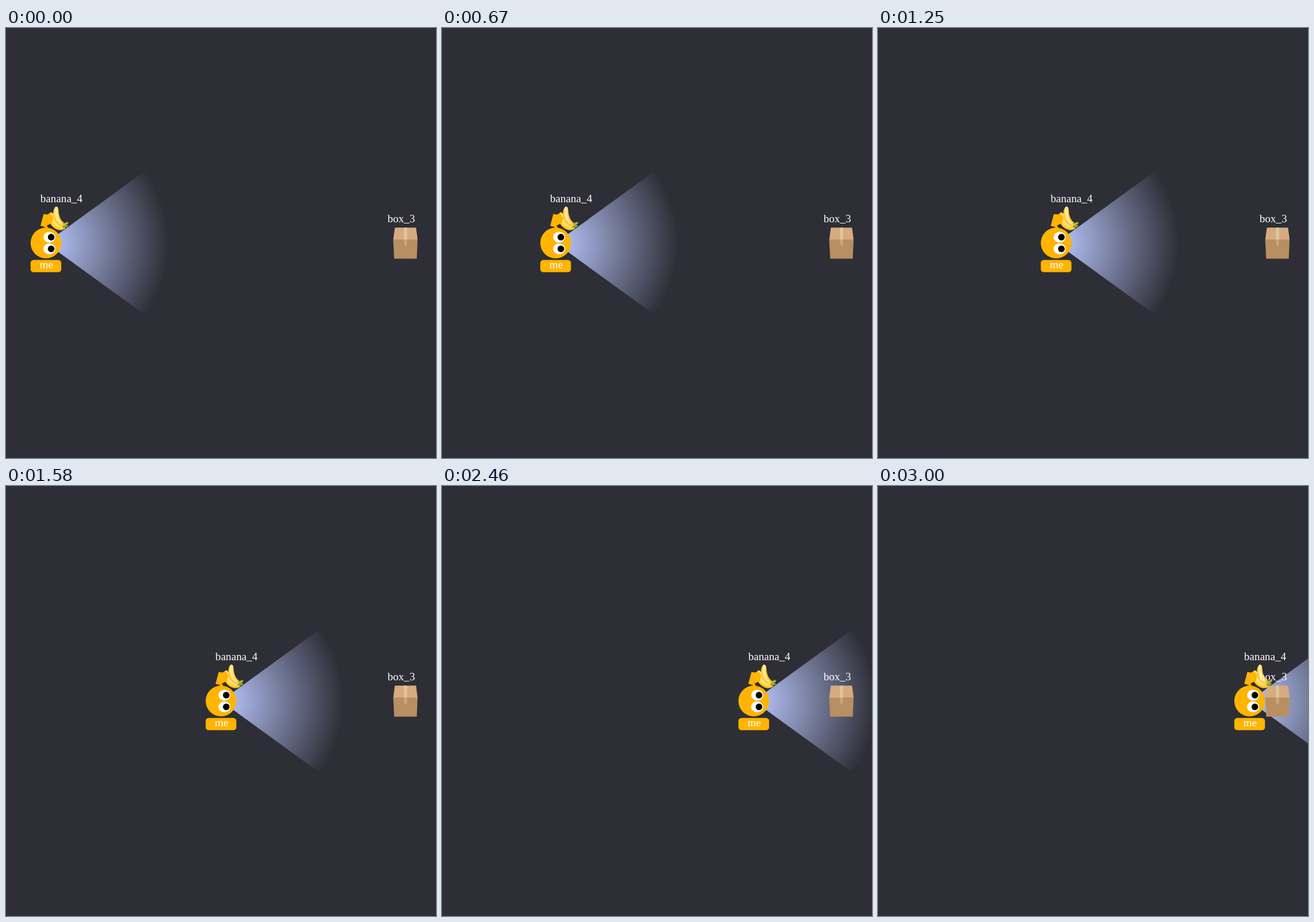
Animation, 748 px wide and 748 px high, one loop 3290 ms. Source, as an HTML page:

```html
<!DOCTYPE html>
<html lang="en">
<head>
<meta charset="utf-8">
<title>Carrying a banana to a box</title>
<style>
  html, body { margin: 0; width: 100%; height: 100%; overflow: hidden; background: #2e2e36; }
  svg { display: block; width: 100vw; height: 100vh; }
  text { font: 19.1px "Liberation Serif", "Times New Roman", Times, serif; fill: #fff; }
</style>
</head>
<body>
<svg viewBox="0 0 748 748">
  <defs>
    <radialGradient id="light" gradientUnits="userSpaceOnUse" cx="69.46" cy="374" r="213.7">
      <stop offset="0" stop-color="#bac8ff"/>
      <stop offset="1" stop-color="#bac8ff" stop-opacity="0"/>
    </radialGradient>
  </defs>

  <g class="mover">
    <path fill="url(#light)" d="M69.46 374L242.35 248.39A213.7 213.7 0 0 1 242.35 499.61Z"/>

    <!-- banana -->
    <path fill="#fdd835" d="M77 321C80 320 82 323 84 328C87 337 94 343 103 345L103 349C97 353 89 352 83 347C76 342 74 332 77 321Z"/>
    <path fill="#ffe082" d="M77 321C80 320 82 323 84 328C87 337 94 343 102 346C92 348 85 344 81 338C78 333 76 327 77 321Z"/>
    <path fill="#fbc02d" d="M77 339C83 346 92 350 102 349C97 353 89 352 83 347C80 345 78 342 77 339Z"/>
    <path fill="#ffca28" d="M86 311Q88 310 90 312C92 315 91 321 93 327C95 334 99 338 104 341L101 346C93 346 86 340 83 332C81 324 82 315 86 311Z"/>
    <path fill="#ffe59a" d="M86 311Q88 310 90 312C91 315 89 321 91 328C92 335 97 341 102 343C95 343 88 337 86 330C84 323 84 316 86 311Z"/>
    <path fill="#9aa32c" d="M98 340Q102 340 106 337L109 339Q107 342 104 343L108 343L107 346Q103 346 101 349L98 346L100 343Z"/>
    <path fill="#c0ca33" d="M99 341Q103 341 106 339L107 340Q104 342 100 344Z"/>

    <g fill="#ffb400">
      <path d="M60 344L65.5 323.5L72 324.5L77 321.5L82.5 330L80 339.5L71 343.5L74 349H65L68.5 346.5Z"/>
      <circle cx="69.46" cy="374" r="26.7"/>
      <rect x="42.75" y="403.4" width="53.4" height="21.4" rx="5.3"/>
    </g>
    <g fill="#fff">
      <ellipse cx="75.5" cy="363.8" rx="10.5" ry="9.4"/>
      <ellipse cx="75.5" cy="384.2" rx="10.5" ry="9.4"/>
    </g>
    <circle cx="78.6" cy="363.8" r="5.8"/>
    <circle cx="78.6" cy="384.2" r="5.8"/>
  </g>

  <path fill="#d6ab80" d="M676.5 347.3H713.3L716 368.5H673.6Z"/>
  <path fill="#b78f61" d="M673.6 368H716L714.5 401.2H675.3Z"/>
  <path fill="#e0c59e" d="M692.3 347.3H697.7V368H692.3Z"/>
  <path fill="#c7a678" d="M692.3 368H697.7V378.5H692.3Z"/>

  <g class="mover">
    <text x="59.8" y="302.8">banana_4</text>
    <text x="58.6" y="417.8">me</text>
  </g>
  <text x="663.7" y="337.8">box_3</text>
</svg>
<script>
  const LOOP = 3290, STEPS = 72, DISTANCE = 577.03;
  const movers = document.querySelectorAll(".mover");

  // Steps run at 24 per second, with their start times rounded to 10 ms.
  const startOf = n => Math.round(n * 100 / 24) * 10;

  function draw(now) {
    const t = now % LOOP;
    let n = Math.min(STEPS, Math.ceil(t * 24 / 1000) + 1);
    while (n > 0 && startOf(n) > t) n--;
    const x = n * DISTANCE / STEPS;
    movers.forEach(m => m.setAttribute("transform", `translate(${x.toFixed(2)} 0)`));
  }

  const start = performance.now();
  function tick() {
    draw(performance.now() - start);
    requestAnimationFrame(tick);
  }
  tick();
</script>
</body>
</html>
```
